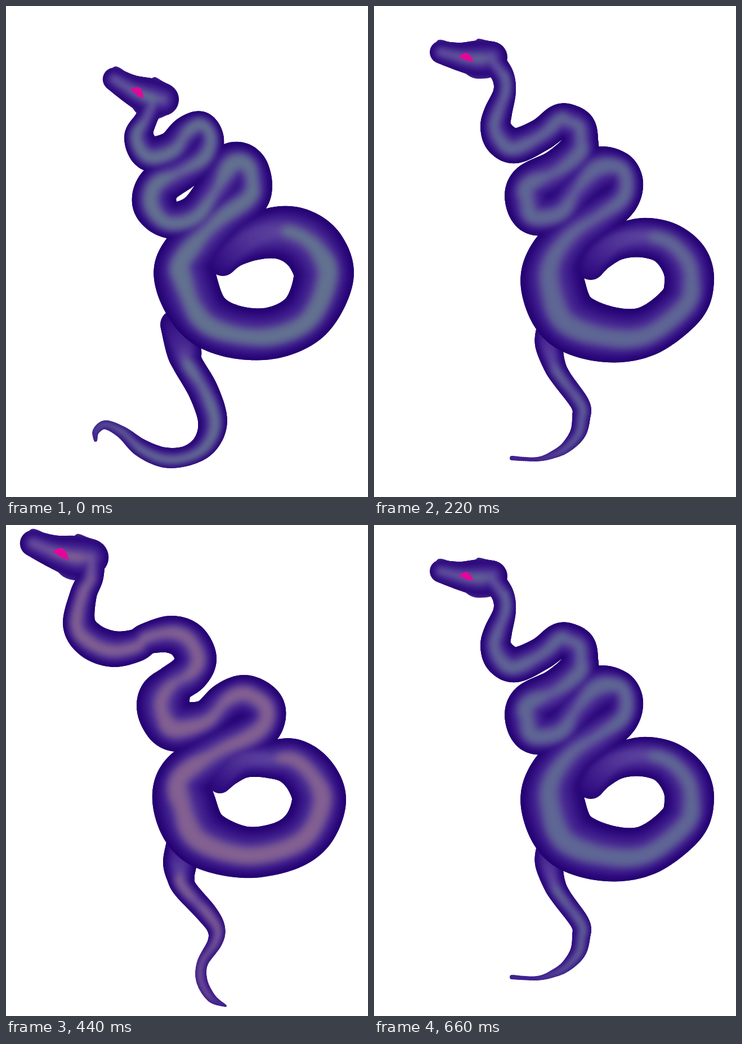
Animation, 643 px wide and 871 px high, one loop 0.88 s. Source, as an HTML page with a canvas:

```html
<!DOCTYPE html>
<html lang="en">
<head>
<meta charset="utf-8">
<title>Snake</title>
<style>
html, body { margin: 0; width: 100%; height: 100%; overflow: hidden; background: #fff; }
canvas { display: block; }
</style>
</head>
<body>
<canvas id="stage" width="643" height="871"></canvas>
<script>
const W = 643, H = 871, STEP = 220, LAYERS = 18, SUB = 14;
const ORDER = [0, 1, 2, 1];

// Centre lines are key points "x,y,radius": the body runs from the neck, the tail from its tip.
const POSES = [
  {
    head: { x: 233, y: 152, turn: 17, size: 1.03 },
    tone: '#647e8c',
    body: `262,170,23 249,200,20 236,232,26 255,262,31 295,254,32 322,226,31 346,215,28 360,236,27
      348,268,32 312,293,34 272,318,38 264,352,39 290,379,33 335,370,34 370,330,36 400,288,44
      426,287,38 435,318,38 423,345,40 375,385,43 322,447,50 320,490,55 349,549,50 402,577,47
      473,580,46 534,549,48 564,483,53 551,437,54 520,410,51 482,402,46 440,412,39 405,435,28
      385,455,24`,
    tail: `159,770,3 160,754,6 177,743,8 207,757,11 240,784,16 282,801,18 324,797,18 355,775,22
      367,736,26 351,684,27 322,633,27 315,608,31 300,565,26`
  },
  {
    head: { x: 163, y: 91, turn: 0, size: 1 },
    tone: '#607091',
    body: `208,95,22 228,122,20 232,152,20 220,190,25 216,214,27 227,237,31 252,248,31 297,228,29
      328,205,30 345,206,32 362,216,32 366,238,32 360,262,36 325,292,37 280,318,40 275,345,42
      288,369,38 330,362,36 362,325,36 396,293,42 432,290,33 445,313,33 436,343,34 400,372,38
      355,405,42 322,450,50 318,497,57 345,555,55 413,582,50 484,577,44 546,531,43 560,488,44
      551,451,43 520,421,38 477,411,35 434,419,31 402,440,28 385,462,24`,
    tail: `245,802,4 290,804,4 320,795,7 342,782,10 362,758,14 368,730,16 366,706,17 333,660,18
      320,636,20 310,600,24 308,575,20`
  },
  {
    head: { x: 97, y: 50, turn: 8, size: 1.16 },
    tone: '#8e688e',
    body: `152,58,24 150,92,23 137,125,24 130,176,29 152,206,32 190,220,32 230,214,29 252,201,28
      292,194,33 322,206,36 337,236,37 326,262,36 297,284,36 280,310,46 283,338,46 305,357,45
      355,345,35 392,314,36 425,304,38 455,322,39 456,350,38 430,375,40 375,405,44 318,450,48
      318,500,56 347,553,53 420,580,46 491,571,45 536,541,47 556,489,48 541,447,46 509,420,41
      468,416,33 425,418,30 397,435,26 380,456,20`,
    tail: `390,853,2 365,839,8 348,809,10 349,777,10 371,740,13 373,715,16 356,688,19 318,645,21
      310,622,25 309,598,30 312,570,28`
  }
];

// Head parts are placed around the eye and shared by every pose.
const HEAD = `-58,-9 -56,-19 -51,-29 -43,-31 -23,-26 2,-26 15,-28 22,-33 33,-31 47,-27 59,-21 66,-10
  66,3 68,14 48,34 25,38 9,35 -5,25 -20,16 -38,12 -51,6`;
const EYE = '-13,0 -3,-7 5,-6 13,7 2,6 -8,1';
const RIDGE = '-44,-9,20 -10,-1,25 25,2,32 46,0,28';

const RAMP = [[0, 34, 0, 112], [0.35, 58, 24, 137], [0.7, 84, 56, 153], [1, 96, 74, 160]];

const nums = s => s.trim().split(/\s+/).map(p => p.split(',').map(Number));

function spline(a, b, c, d, t) {
  return b.map((v, k) => v + t / 2 * (c[k] - a[k]
    + t * (2 * a[k] - 5 * v + 4 * c[k] - d[k] + t * (3 * (v - c[k]) + d[k] - a[k]))));
}

function sample(p) {
  const out = [];
  for (let i = 0; i < p.length - 1; i++) {
    for (let j = 0; j < SUB; j++) {
      out.push(spline(p[i - 1] || p[i], p[i], p[i + 1], p[i + 2] || p[i + 1], j / SUB));
    }
  }
  return [...out, p[p.length - 1]];
}

// Dots along a tube: light leans to the outside of bends and fades where the end is tucked under.
function tube(points, fade) {
  const line = sample(points), end = line.length - 1;
  return line.map(([x, y, r], i) => {
    const a = line[Math.max(0, i - SUB)], b = line[Math.min(end, i + SUB)];
    const inside = i >= SUB && i <= end - SUB;
    const dx = inside ? x - (a[0] + b[0]) / 2 : 0, dy = inside ? y - (a[1] + b[1]) / 2 : 0;
    const bend = Math.hypot(dx, dy), lean = Math.min(0.35, 0.2 * r / (bend + 0.01));
    return {
      x, y, r, dx: dx * lean, dy: dy * lean,
      bend: Math.min(1, bend / (0.35 * r + 1)),
      thin: 0.45 * Math.max(0, 1 - r / 28),
      cap: fade ? 0.15 + (end - i) / fade : 1
    };
  });
}

function shade(t) {
  const i = Math.max(1, RAMP.findIndex(s => s[0] >= t));
  const a = RAMP[i - 1], b = RAMP[i], f = (t - a[0]) / (b[0] - a[0]);
  return `rgb(${[1, 2, 3].map(k => Math.round(a[k] + (b[k] - a[k]) * f))})`;
}

function layer() {
  const c = document.createElement('canvas');
  c.width = W;
  c.height = H;
  return c.getContext('2d');
}

function disc(g, x, y, r, color) {
  g.fillStyle = color;
  g.beginPath();
  g.arc(x, y, Math.max(0, r), 0, 7);
  g.fill();
}

function place({ x, y, turn, size }, text) {
  const c = size * Math.cos(turn * Math.PI / 180), s = size * Math.sin(turn * Math.PI / 180);
  return nums(text).map(([u, v, r = 0]) => [x + u * c - v * s, y + u * s + v * c, r * size]);
}

function closed(points) {
  const path = new Path2D(), n = points.length, at = i => points[(i + n) % n];
  for (let i = 0; i < n; i++) {
    for (let t = 0; t < 1; t += 0.125) {
      const [x, y] = spline(at(i - 1), at(i), at(i + 1), at(i + 2), t);
      path.lineTo(x, y);
    }
  }
  path.closePath();
  return path;
}

function paint(dots, tone, head) {
  const skin = layer(), shine = layer(), g = layer();
  for (const d of dots) disc(skin, d.x, d.y, d.r + 6, shade(d.thin));
  if (head) {
    skin.fillStyle = skin.strokeStyle = shade(0.35);
    skin.lineWidth = 8;
    skin.fill(head);
    skin.stroke(head);
  }
  for (let k = 1; k < LAYERS; k++) {
    const t = k / LAYERS;
    for (const d of dots) {
      if (t <= d.cap) disc(skin, d.x + d.dx * t, d.y + d.dy * t, d.r * (1 - t), shade(Math.max(t, d.thin)));
    }
  }
  for (const d of dots) {
    if (d.cap >= 1) disc(shine, d.x + d.dx, d.y + d.dy, d.r * (0.1 + 0.22 * d.bend), tone);
  }
  skin.filter = 'blur(6px)';
  skin.globalAlpha = 0.8;
  skin.drawImage(shine.canvas, 0, 0);

  for (const d of dots) disc(g, d.x, d.y, d.r, '#000');
  if (head) g.fill(head);
  g.globalCompositeOperation = 'source-in';
  g.filter = 'blur(3px)';
  g.drawImage(skin.canvas, 0, 0);
  return g.canvas;
}

function render(pose) {
  const g = layer(), { head, tone } = pose;
  const front = [...tube(nums(pose.body), 4 * SUB), ...tube(place(head, RIDGE), 0)];
  g.drawImage(paint(tube(nums(pose.tail), 2.5 * SUB), tone), 0, 0);
  g.drawImage(paint(front, tone, closed(place(head, HEAD))), 0, 0);
  g.fillStyle = '#e4069a';
  g.fill(closed(place(head, EYE)));
  return g.canvas;
}

const pictures = POSES.map(render);
const stage = document.getElementById('stage').getContext('2d');
const start = performance.now();
let shown = -1;

function draw(now) {
  const beat = Math.floor(Math.max(0, now - start) / STEP) % ORDER.length;
  if (ORDER[beat] !== shown) {
    shown = ORDER[beat];
    stage.fillStyle = '#fff';
    stage.fillRect(0, 0, W, H);
    stage.drawImage(pictures[shown], 0, 0);
  }
  requestAnimationFrame(draw);
}
draw(start);
</script>
</body>
</html>
```
